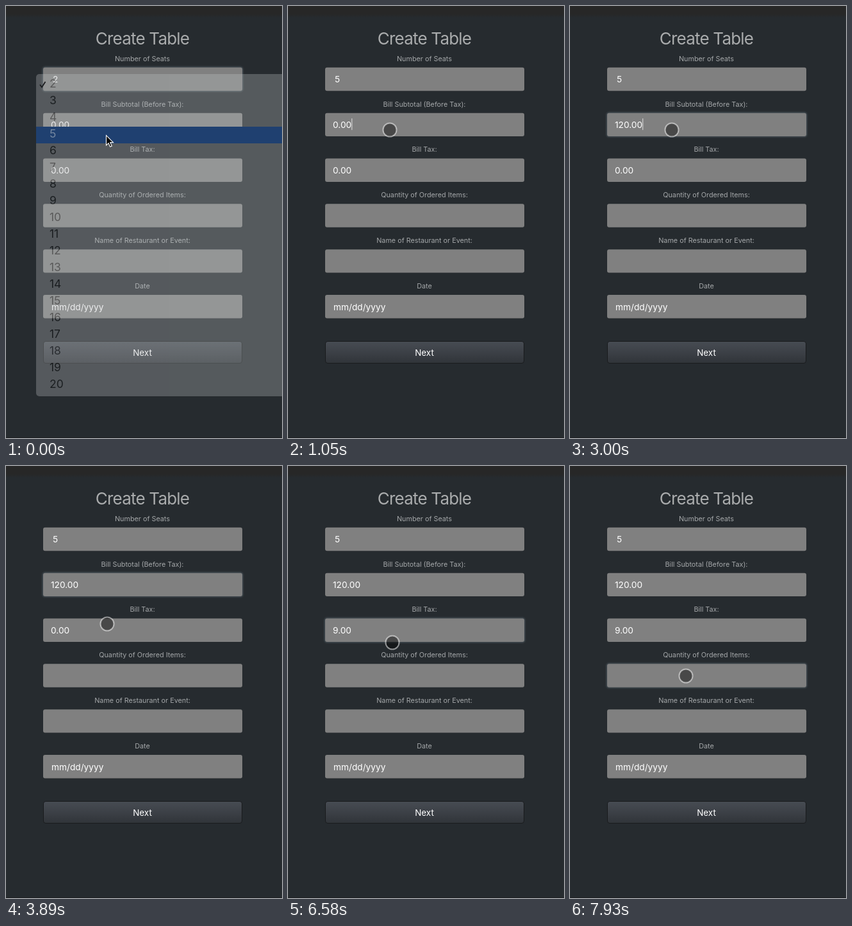
An HTML page that plays this animation: 431x673 px, repeating every 8 s.

```html
<!DOCTYPE html>
<html lang="en">
<head>
<meta charset="utf-8">
<title>Create Table</title>
<style>
  html, body { margin: 0; width: 100%; height: 100%; overflow: hidden; background: #262b2f; }
  svg { display: block; width: 431px; height: 673px; }
  text { font-family: Inter, "Open Sans", sans-serif; font-optical-sizing: none; white-space: pre; }
  .title { font-size: 26px; letter-spacing: -.8px; fill: #aaacad; text-anchor: middle; }
  .label { font-size: 10.8px; fill: #a4a7a9; text-anchor: middle; }
  .value { font-size: 13.7px; fill: #fff; }
  .button { font-size: 13.4px; fill: #fff; text-anchor: middle; }
  .item { font-size: 17.5px; }
</style>
</head>
<body>
<svg id="stage" viewBox="0 0 431 673">
  <defs>
    <linearGradient id="strip" x2="0" y2="1">
      <stop offset="0" stop-color="#272727"/>
      <stop offset=".7" stop-color="#272727"/>
      <stop offset="1" stop-color="#262b2f"/>
    </linearGradient>
    <linearGradient id="metal" x2="0" y2="1">
      <stop offset="0" stop-color="#474c53"/>
      <stop offset=".6" stop-color="#3a3e44"/>
      <stop offset="1" stop-color="#303439"/>
    </linearGradient>
    <filter id="soft" x="-5%" y="-30%" width="110%" height="160%">
      <feGaussianBlur stdDeviation="1.2"/>
    </filter>
  </defs>
  <rect width="431" height="673" fill="#262b2f"/>
  <rect width="431" height="18" fill="url(#strip)"/>
  <rect y="672" width="431" height="1" fill="#1b1d1f"/>
  <text class="title" x="213" y="60">Create Table</text>
  <g id="form"></g>
  <rect x="58.5" y="522.5" width="310" height="34" rx="3.5" fill="url(#metal)" stroke="#191b1d"/>
  <text class="button" x="213" y="544.7">Next</text>
  <rect id="caret" width="1.2" height="18" fill="#cfcfcf"/>
  <g id="menu"></g>
  <circle id="touch" r="10.5" fill="#000" fill-opacity=".44" stroke="#fff" stroke-opacity=".52" stroke-width="2"/>
</svg>
<script>
const LOOP = 8000;
const LABELS = ["Number of Seats", "Bill Subtotal (Before Tax):", "Bill Tax:",
  "Quantity of Ordered Items:", "Name of Restaurant or Event:", "Date"];
const $ = id => document.getElementById(id);

function add(parent, tag, attrs, text = "") {
  const node = document.createElementNS("http://www.w3.org/2000/svg", tag);
  for (const key in attrs) node.setAttribute(key, attrs[key]);
  node.textContent = text;
  return parent.appendChild(node);
}

const fieldTop = i => 95.8 + 70.85 * i;

const fields = LABELS.map((label, i) => {
  const y = fieldTop(i);
  const box = { x: 58, y, width: 311, height: 36.4, rx: 3 };
  add($("form"), "text", { class: "label", x: 213, y: y - 10.1 }, label);
  const ring = add($("form"), "rect", { ...box, fill: "none", stroke: "#5d6a73",
    "stroke-width": 2.5, "stroke-opacity": .6, filter: "url(#soft)" });
  add($("form"), "rect", { ...box, fill: "#808080" });
  const value = add($("form"), "text",
    { class: "value", x: i === 0 ? 73 : i === 5 ? 71 : 70, y: y + 23.6 });
  return { ring, value };
});
fields[5].value.textContent = "mm/dd/yyyy";

function buildMenu() {
  const menu = $("menu");
  const faded = add(menu, "g", { opacity: .3 });
  add(faded, "rect", { x: 47, y: 106, width: 400, height: 502, rx: 5, fill: "#c1c5c7" });
  add(menu, "rect", { x: 47, y: 188, width: 384, height: 26, fill: "#1f4070" });
  for (let n = 2; n <= 20; n++) {
    const chosen = n === 5;
    add(chosen ? menu : faded, "text",
      { class: "item", x: 68, y: 127.3 + 26 * (n - 2), fill: chosen ? "#7487a0" : "#000" }, n);
  }
  add(menu, "path", { d: "M53 122.5l3 4 5.5-8.5", fill: "none", stroke: "#1b1d1f", "stroke-width": 1.8 });
  add(menu, "path", { d: "M156.5 201.5v15.5l3.6-3.4 2.5 5.7 2.6-1.1-2.4-5.6h4.7z",
    fill: "#000", stroke: "#fff", "stroke-width": 1.1 });
}
buildMenu();

// Each timeline lists [start time, ...state]; states hold until the next entry.
const touchSteps = [[0, 157, 204], [450, 158, 200], [600, 159, 195], [750, 159, 193],
  [3590, 159, 198], [3740, 159, 222], [3890, 158, 246], [4040, 158, 258], [4180, 158, 260],
  [6580, 163, 275], [6730, 171, 297], [6880, 178, 315], [7030, 180, 324], [7180, 181, 327]];
const subtotalSteps = [[0, "0.00"], [1800, "0.01"], [1950, "0.12"], [2400, "1.20"],
  [2550, "12.00"], [3000, "120.00"]];
const taxSteps = [[0, "0.00"], [5230, "0.09"], [5530, "0.90"], [5680, "9.00"]];
const focusSteps = [[0, 0], [750, -1], [1800, 1], [4040, 2], [7180, 3]];
const caretSteps = [[0, 0], [1050, 1], [1500, 0], [1800, 1], [3590, 0], [4180, 2], [4630, 0],
  [5230, 2], [6130, 0], [6730, 2], [7180, 0], [7480, 3], [7930, 0]];

const stateAt = (steps, t) => steps.findLast(step => step[0] <= t).slice(1);
const show = (node, on) => node.setAttribute("visibility", on ? "visible" : "hidden");

function draw(t) {
  const menuOpen = t < 150;
  show($("menu"), menuOpen);
  show($("touch"), !menuOpen);

  const [x, y] = stateAt(touchSteps, t);
  $("touch").setAttribute("cx", x);
  $("touch").setAttribute("cy", y);

  fields[0].value.textContent = menuOpen ? "2" : "5";
  fields[1].value.textContent = stateAt(subtotalSteps, t)[0];
  fields[2].value.textContent = stateAt(taxSteps, t)[0];

  const [focused] = stateAt(focusSteps, t);
  fields.forEach((field, i) => show(field.ring, i === focused));

  const [caretField] = stateAt(caretSteps, t);
  show($("caret"), caretField);
  if (caretField) {
    const text = fields[caretField].value;
    const end = text.textContent ? text.getComputedTextLength() : 0;
    $("caret").setAttribute("x", 70 + end);
    $("caret").setAttribute("y", fieldTop(caretField) + 8.5);
  }
}

const start = performance.now();
function tick() {
  draw((performance.now() - start) % LOOP);
  requestAnimationFrame(tick);
}
tick();
</script>
</body>
</html>
```
